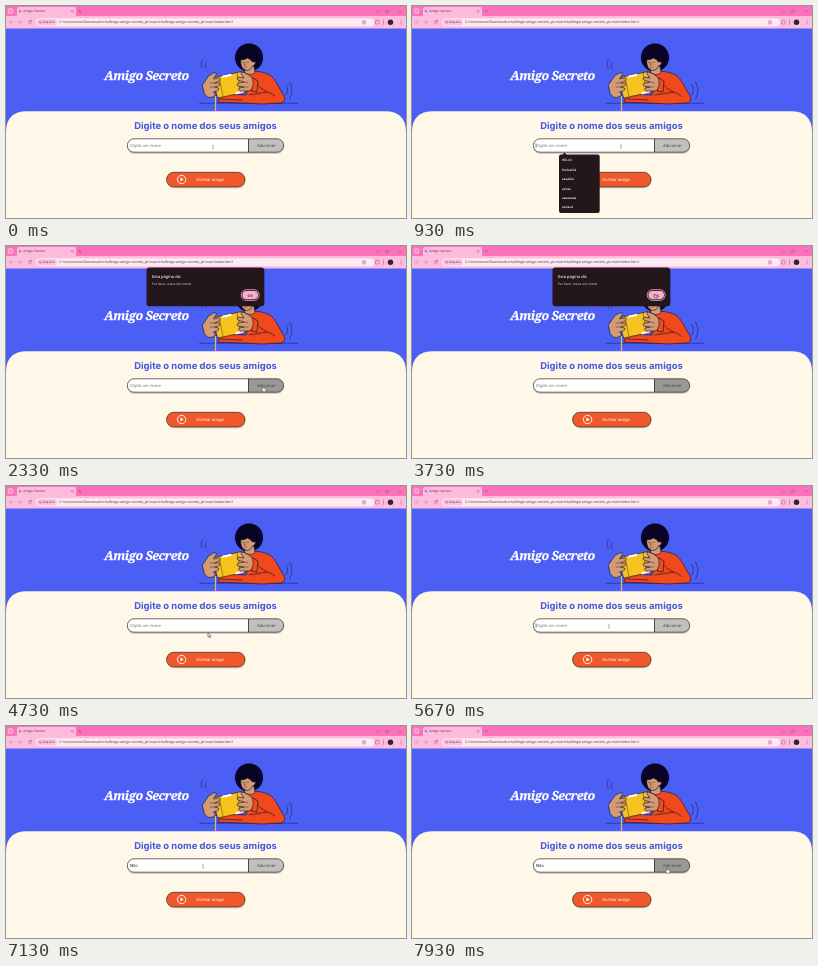
Animation, 400 px wide and 212 px high, one loop 8000 ms. Source, as an HTML page:

```html
<!DOCTYPE html>
<html lang="pt">
<head>
<meta charset="utf-8">
<title>Amigo Secreto</title>
<style>
html, body { margin: 0; width: 100%; height: 100%; overflow: hidden; background: #4b5ff5; }
svg { display: block; width: 100vw; height: 100vh; }
text { font-family: Inter, sans-serif; text-rendering: geometricPrecision; white-space: pre; }
.ui text { font-family: "Open Sans", sans-serif; font-size: 3.54px; fill: #4a3040; }
.ui .tab { font-size: 3.3px; }
.icon { fill: none; stroke: #a0507c; stroke-width: .5; stroke-linecap: round; }
.title { font: italic 900 12.5px "Noto Serif", serif; letter-spacing: -.5px; fill: #fff; stroke: #fff; stroke-width: .25; }
.heading { font-size: 9.45px; font-weight: 700; fill: #4457dc; }
.label { font-size: 4.2px; }
.ink { stroke: #120c2c; stroke-width: .6; stroke-linejoin: round; stroke-linecap: round; }
.line { fill: none; }
.skin { fill: #d39b72; }
.sweater { fill: #f0491b; }
.outline { stroke: #2b2a2a; stroke-width: .7; }
.menu text { font-size: 3.1px; font-weight: 600; fill: #f6e9ee; }
.alert text { font-family: "Open Sans", sans-serif; fill: #f5e6ec; }

/* One shared 8 s clock: 1% is 80 ms */
.add, .menu, .alert, .placeholder, .caret, .key, .ibeam, .arrow, .hand {
  animation: 8s step-end infinite;
}
.add { animation-name: hover; }
.menu { animation-name: menu; animation-timing-function: linear; }
.alert { animation-name: alert; animation-timing-function: linear; }
.placeholder { animation-name: placeholder; }
.caret { animation-name: caret; }
.ibeam { animation-name: ibeam; }
.arrow { animation-name: arrow; }
.hand { animation-name: hand; }
.pointer { animation: move 8s ease-in-out infinite; }
.k1 { animation-name: k1; } .k2 { animation-name: k2; }
.k3 { animation-name: k3; } .k4 { animation-name: k4; }

@keyframes hover {
  0%, 49.4%, 100% { fill: #c1c0bf; }
  18.2%, 98.2% { fill: #999897; }
}
@keyframes menu {
  0%, 6.2%, 16%, 71.5%, 81.8%, 100% { opacity: 0; }
  7.6%, 14.5%, 73%, 79.9% { opacity: 1; }
}
@keyframes alert {
  0%, 22.5%, 50.4%, 100% { opacity: 0; }
  24%, 49.2% { opacity: 1; }
}
@keyframes placeholder {
  0% { opacity: 1; }
  79.75%, 100% { opacity: 0; }
}
@keyframes caret {
  0%, 12.5%, 18.5%, 74.8%, 100% { opacity: 0; }
  6%, 68.5% { opacity: 1; }
}
@keyframes k1 { 0% { fill-opacity: 0; } 79.75%, 100% { fill-opacity: 1; } }
@keyframes k2 { 0% { fill-opacity: 0; } 82.8%, 100% { fill-opacity: 1; } }
@keyframes k3 { 0% { fill-opacity: 0; } 86%, 100% { fill-opacity: 1; } }
@keyframes k4 { 0% { fill-opacity: 0; } 88.5%, 100% { fill-opacity: 1; } }
@keyframes move {
  0% { transform: translate(207px, 141px); }
  11%, 14% { transform: translate(209px, 140.5px); }
  20.5%, 34% { transform: translate(257px, 140.5px); }
  43%, 50% { transform: translate(242.5px, 48px); }
  58%, 60% { transform: translate(202px, 147px); }
  66%, 93% { transform: translate(197px, 140.3px); }
  98.8%, 100% { transform: translate(255px, 142px); }
}
@keyframes ibeam {
  0%, 62.8% { opacity: 1; }
  18.2%, 98.2%, 100% { opacity: 0; }
}
@keyframes arrow {
  0%, 62.8%, 100% { opacity: 0; }
  36.5% { opacity: 1; }
}
@keyframes hand {
  0%, 36.5% { opacity: 0; }
  18.2%, 98.2%, 100% { opacity: 1; }
}
</style>
</head>
<body>
<svg viewBox="0 0 400 212" preserveAspectRatio="none">
  <rect width="400" height="212" fill="#4b5ff5"/>

  <g class="ui">
    <rect width="400" height="11" fill="#fb72ba"/>
    <path d="M9 11q2 0 2-2V3q0-2 2-2h55q2 0 2 2v6q0 2 2 2z" fill="#fdbcdd"/>
    <rect y="10" width="400" height="12.5" fill="#fdbcdd"/>
    <rect x="1.5" y="2" width="6" height="6" rx="2" fill="#fda5d2"/>
    <circle cx="14" cy="5.2" r="1.4" fill="#b48ba2"/>
    <text class="tab" x="17.3" y="6.3">Amigo Secreto</text>
    <rect x="30" y="12.2" width="338" height="8" rx="4" fill="#feeaf4"/>
    <rect x="31" y="12.9" width="20" height="6.6" rx="3.3" fill="#fbc4df"/>
    <circle cx="34.5" cy="16.2" r="1.2" class="icon"/>
    <text class="tab" x="37" y="17.4">Arquivo</text>
    <text x="53" y="17.4">C:/Users/tavio/Downloads/challenge-amigo-secreto_pt-main/challenge-amigo-secreto_pt-main/index.html</text>
    <g class="icon">
      <path d="M3.6 4.5l1 1 1-1M65.2 4.2l2 2m0-2l-2 2M72.5 5.2h3m-1.5-1.5v3"/>
      <path d="M6.500 16.2H3.500m1.400-1.400l-1.400 1.400 1.400 1.400M12 16.2h3m-1.400-1.400l1.400 1.400-1.400 1.400" opacity=".6"/>
      <path d="M25.2 15.2a1.6 1.6 0 1 0 .3 1.600M25.400 14.100v1.300h-1.300"/>
      <path d="M370 5.2h2.400M380 4.100h2.200v2.200h-2.200zM392.900 4.100l2.300 2.300m0-2.300l-2.300 2.300"/>
      <path d="M358 14.3l.6 1.3 1.4.2-1 1 .3 1.4-1.3-.7-1.3.7.3-1.4-1-1 1.4-.2z"/>
      <path d="M370 15h1v-.8h1v.8h1v3h-3zM377.500 14.2v4"/>
      <path d="M395 14.5v0M395 16.2v0M395 17.9v0" stroke-width=".9"/>
    </g>
    <circle cx="384.500" cy="16.2" r="2.700" fill="#2d2230"/>
  </g>

  <text class="title" x="98.300" y="74">Amigo Secreto</text>

  <path d="M0 212V126Q0 105.200 21 105.200H379Q400 105.200 400 126V212z" fill="#fff8e9"/>

  <g class="ink">
    <path class="line" d="M193.500 97.300H292M196.500 54q-3 4 0 8M200 57q-2 2 0 5M280 79q3 5 0 10M283.500 76q5 8 0 17" stroke-width=".45"/>
    <path class="sweater" d="M238 66q12-2 21 1 7 2 11 9l8 14q3 6-4 7-18 2-36 0l-26-1 2-8 26 1 4-10z"/>
    <path class="line" d="M248 75q6 8 13 11l-18 3M261 86q5 1 8 4M214 93l22 1"/>
    <circle cx="243" cy="51.500" r="12.800" fill="#090423"/>
    <circle cx="243" cy="51.500" r="13.300" fill="none" stroke="#090423" stroke-width="1.600" stroke-dasharray="2.200 1.200"/>
    <path class="skin" d="M239 60h9l1 7q-5 3-10 0z"/>
    <path class="skin" d="M234.500 54q4 0 7-2 3 1 5 4 3-1 3 1t-3 3q-2 5-6 4.500-6-1-6-10.500z"/>
    <path class="line" d="M236.500 56.500h1.400M241 56.300h1.500M239 56.500l-.8 2.700h1.200" stroke-width=".4"/>
    <path d="M238 61.300q2 .8 3.200-.5" fill="none" stroke="#b8322b"/>
    <path d="M206 72l30-6.500 4 20.500-28 6z" fill="#f8c31f"/>
    <path d="M216 69.800l9-2 .6 2-9 2zM229 86.300l8-1.600.6 2-8 1.700z" fill="#fff" stroke="none"/>
    <path class="line" d="M213 71l4 19M231 67l4 19" stroke-width=".4"/>
    <path class="skin" d="M196.500 79l6-9 5-3q3-1 3 1l-3 5 5-1q3 1 1 3l-5 2 5 0q2 2-1 3l-4 1 4 1q1 2-1 3l-4 1 2 2q0 2-3 3-5 2-8-3z"/>
    <path class="skin" d="M248 74l-5-5-6-3q-3 0-2 2l3 4-6-1q-2 2 0 3l6 2-6 1q-2 2 0 3l6 1-5 1q-1 2 1 3l6 0q5 1 9-6z"/>
    <path class="line" d="M204 77l4 0M204 81l4 0M238 76l4 1M238 81l4 0" stroke-width=".4"/>
    <path class="sweater" d="M247 72l5 3-1 11-6-1 2-6z"/>
  </g>
  <path d="M209.500 90V105.500" stroke="#e8bd45" stroke-width="1.200"/>

  <text class="heading" x="199.500" y="122.500" text-anchor="middle">Digite o nome dos seus amigos</text>

  <path d="M128 134.300H271a6.800 6.800 0 0 1 0 13.600H128a6.800 6.800 0 0 1 0-13.600z" opacity=".16"/>
  <path class="outline" d="M242.500 132.800H128a6.700 6.700 0 0 0 0 13.400H242.500z" fill="#fff"/>
  <path class="add outline" d="M242.500 132.800H271a6.700 6.700 0 0 1 0 13.400H242.500z"/>
  <text class="label placeholder" x="124" y="141" fill="#777">Digite um nome</text>
  <text class="label" x="124" y="141" fill="#111"><tspan class="key k1">N</tspan><tspan class="key k2">i</tspan><tspan class="key k3">l</tspan><tspan class="key k4">o</tspan></text>
  <path class="caret" d="M123.900 137.200v4.600" stroke="#222" stroke-width=".4"/>
  <text class="label" x="260.300" y="141" text-anchor="middle" fill="#484848">Adicionar</text>

  <rect x="161" y="168" width="78.500" height="14.600" rx="7.300" opacity=".16"/>
  <rect class="outline" x="160.500" y="166.300" width="78.500" height="14.600" rx="7.300" fill="#f1592b"/>
  <circle cx="175.600" cy="173.500" r="4.200" fill="none" stroke="#fff" stroke-width=".9"/>
  <path d="M174.400 171.500l3.200 2-3.200 2z" fill="#fff"/>
  <text class="label" x="204.200" y="175" text-anchor="middle" fill="#fff">Sortear amigo</text>

  <g class="menu">
    <path d="M149 148.500h1.500l2-2 2 2H185.700q2 0 2 2V205q0 2-2 2H149q-2 0-2-2V150.500q0-2 2-2z" fill="#24171b"/>
    <text x="150" y="155.300">HELLO</text>
    <text x="150" y="164.700">Kizibafod</text>
    <text x="150" y="174.200">asaafea</text>
    <text x="150" y="183.600">asdas</text>
    <text x="150" y="193">aaaaaaaa</text>
    <text x="150" y="202.400">asdasd</text>
  </g>

  <g class="alert">
    <rect x="140.500" y="21.500" width="117.800" height="38.700" rx="3" fill="#24171b"/>
    <text x="146" y="31.500" font-size="4" font-weight="600">Esta página diz</text>
    <text x="146" y="39.200" font-size="3.200">Por favor, insira um nome!</text>
    <rect x="235.200" y="43.700" width="18" height="10.700" rx="5.300" fill="none" stroke="#f9aed0" stroke-width=".8"/>
    <rect x="236.400" y="44.900" width="15.600" height="8.300" rx="4.100" fill="#f9aed0"/>
    <text x="244.200" y="50.500" text-anchor="middle" font-size="3.700" font-weight="600" style="fill:#542138">OK</text>
  </g>

  <g class="pointer">
    <path class="ibeam" d="M-.7-1.700h1.400M0-1.700v3.400M-.7 1.700h1.400" stroke="#555" stroke-width=".45"/>
    <path class="arrow" d="M0 0v4l1-.8.7 1.500.8-.4-.7-1.400h1.300z" fill="#fff" stroke="#111" stroke-width=".45"/>
    <path class="hand" d="M-.5 0q.6-.7 1.100 0v1.800l1.900.5q.7.300.5 1.200l-.5 1.600H0L-1.700 2.900q.2-.8 1.200 0z" fill="#fff" stroke="#111" stroke-width=".35"/>
  </g>
</svg>
</body>
</html>
```
